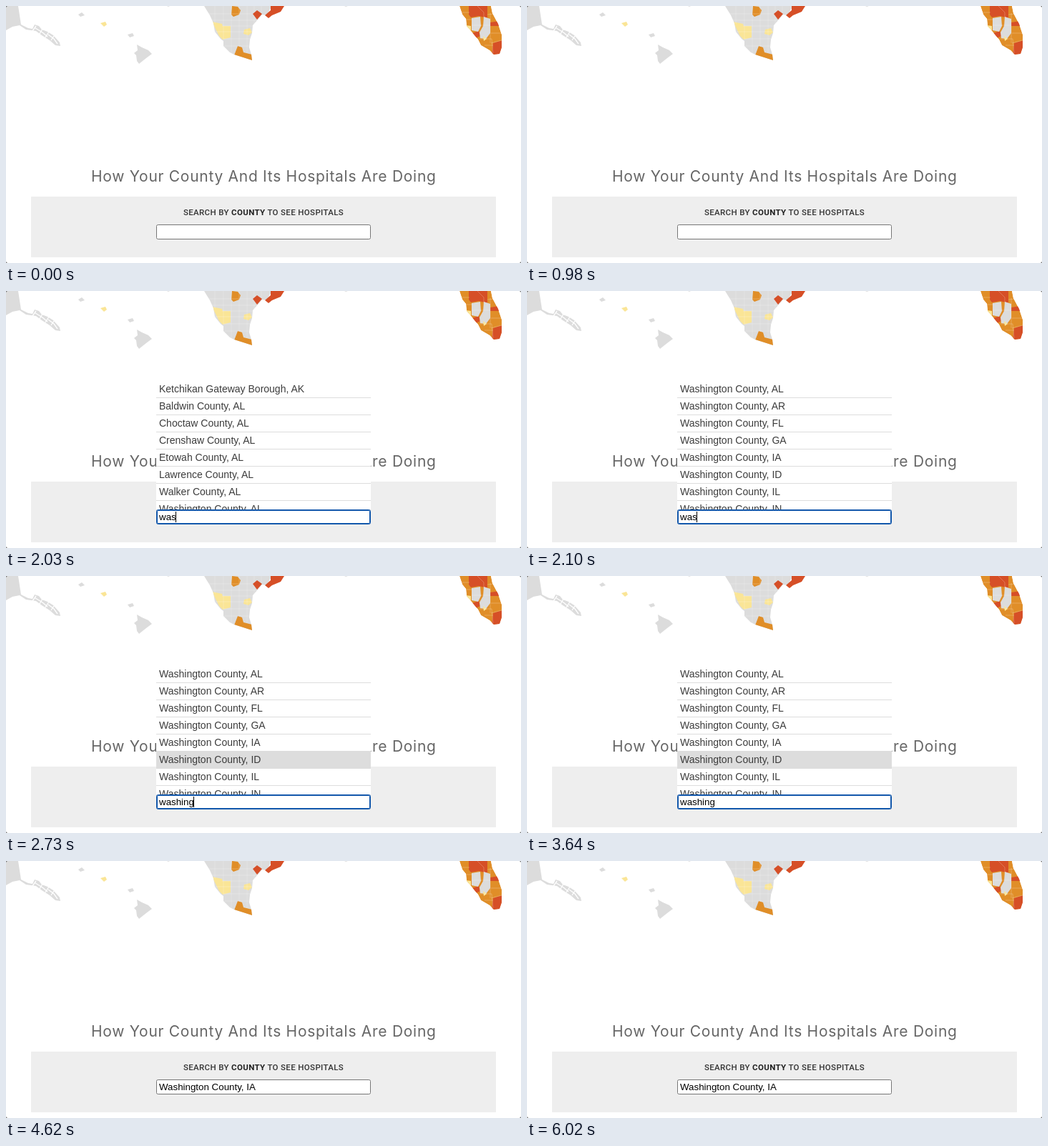
An HTML page for the animation above (6.51 s loop, 720 by 360 pixels).

```html
<!DOCTYPE html>
<html lang="en">
<head>
<meta charset="utf-8">
<title>County search</title>
<style>
  html, body { margin: 0; width: 100%; height: 100%; overflow: hidden; background: #fff; }
  #stage { position: relative; width: 720px; height: 360px; overflow: hidden; }
  svg { position: absolute; left: 0; top: 0; }
  .none { fill: #dcdcdc; }
  .low { fill: #fae596; }
  .mid { fill: #e08e28; }
  .high { fill: #d64f27; }
  .lines { fill: none; stroke: #fff; stroke-width: .5; stroke-opacity: .45; }
  .channels { fill: none; stroke: #fff; stroke-width: 1.3; }
  .heading { font: 400 21px Inter, sans-serif; font-optical-sizing: none; letter-spacing: .72px; fill: #666; }
  .label { font: 500 11.5px Roboto, sans-serif; letter-spacing: .35px; fill: #333; }
  .label tspan { font-weight: 700; fill: #222; }
  #list { position: absolute; left: 210px; top: 126px; width: 300px; height: 180px;
          overflow: hidden; background: #fff; }
  .row { box-sizing: border-box; height: 24px; padding-left: 4px; border-bottom: 1px solid #ddd;
         font: 14px/23px "Liberation Sans", Arial, sans-serif; color: #3c3c3c; white-space: pre; }
  .row.hover { background: #ddd; }
  #field { position: absolute; left: 210px; top: 306px; width: 300px; height: 21px; box-sizing: border-box;
           border: 1px solid #767676; border-radius: 2.5px; padding-left: 3px; background: #fff; color: #000;
           font: 13.333px/19px "Liberation Sans", Arial, sans-serif; white-space: pre; }
  #field.focus { border-color: #1257ab; box-shadow: inset 0 0 0 1px #1257ab; }
  #caret { position: absolute; top: 2px; width: 1px; height: 15px; margin-left: -.6px; background: #000; }
</style>
</head>
<body>
<div id="stage">
  <svg width="720" height="360" viewBox="0 0 720 360">
    <defs>
      <clipPath id="texasClip"><path id="texas" d="M277 0L285 13 290 24 292 36 300 46 304 49 304 56 313 65 319 68 344 76 343 68 340 58 341 47 344 38 345 27 352 19 358 12 364 13 372 0Z"/></clipPath>
      <clipPath id="floridaClip"><path id="florida" d="M634 0L638 12 643 18 644 28 650 35 660 47 664 55 676 62 682 68 690 67 693 58 693 40 688 25 680 10 678 0Z"/></clipPath>
    </defs>

    <g class="none">
      <path d="M0 0H17L21 26 31 31 37 32 40 26 46 28 50 33 58 36 66 41 75 51 76 56 69 55 61 48 50 41 42 35 28 33 19 27 9 29 0 34Z"/>
      <path d="M101 12L106 9 110 13 104 15Z"/>
      <path d="M170 40L177 38 179 42 173 44Z"/>
      <path d="M183 54L190 58 199 62 204 67 196 73 186 81 183 77 182 69 179 66 184 62Z"/>
      <path d="M225 0H229L227 1Z"/>
      <path d="M473 0H478L475 1Z"/>
      <use href="#texas"/>
    </g>
    <path class="channels" d="M37 35L42 28 M41 31L51 37 58 43 M47 39L51 32 M55 44L60 36 M59 40L67 46 72 53 M63 48L67 42"/>
    <path class="low" d="M132 24L139 22 141 26 137 29Z"/>

    <g clip-path="url(#texasClip)">
      <path class="low" d="M288 22L302 25 303 28 314 28 314 44 303 47 298 42Z M333 33L341 31 344 37 339 41 332 39Z"/>
      <path class="mid" d="M316 0L324 1 328 6 326 12 318 15 315 12Z M324 56L330 58 332 65 344 68 345 77 319 69Z"/>
      <path class="lines" d="M280 11H345 M286 20H354 M302 28H352 M292 36H350 M304 46H344 M305 56H342 M292 0V25 M304 0V47 M315 0V68 M326 0V57 M337 0V66 M347 0V40 M357 0V14"/>
    </g>
    <path class="high" d="M345 11L351 6 358 11 351 19Z M370 0H389L384 8 372 13 367 17 362 13 370 6Z"/>

    <g clip-path="url(#floridaClip)">
      <use href="#florida" class="mid"/>
      <path class="high" d="M647 0H673V17L661 14 650 16 647 12Z M677 23L690 21 691 28H677Z M652 38L661 35 663 42 655 46Z M681 52L694 48V69H679Z"/>
      <path class="none" d="M651 17L663 15 664 28 660 36 651 34Z M668 15L677 18V38L671 46 663 45 662 37 667 28Z"/>
      <path class="low" d="M643 27L650 28V35H644Z M667 42L672 46 668 49Z"/>
      <path class="lines" d="M636 9H648 M643 19H652 M659 0L668 9V17 M651 27H677 M677 10V52 M678 38H693 M662 46H679L681 66 M669 55H681 M678 52L693 48 M673 12L682 11"/>
    </g>

    <text class="heading" x="360.3" y="246" text-anchor="middle">How Your County And Its Hospitals Are Doing</text>
    <path fill="#eee" d="M35 267H685V352H35Z"/>
    <text class="label" x="360" y="293.3" text-anchor="middle">SEARCH BY <tspan>COUNTY</tspan> TO SEE HOSPITALS</text>
    <path fill="#777" d="M0 0H2L0 2Z M720 0H718L720 2Z M0 360H2L0 358Z M720 360H718L720 358Z"/>
  </svg>
  <div id="list"></div>
  <div id="field"><span id="typed"></span><span id="caret"></span></div>
</div>
<script>
const LOOP = 6510;
const LISTS = {
  any: ["Ketchikan Gateway Borough, AK",
        ...["Baldwin", "Choctaw", "Crenshaw", "Etowah", "Lawrence", "Walker", "Washington"]
          .map(name => `${name} County, AL`)],
  washington: ["AL", "AR", "FL", "GA", "IA", "ID", "IL", "IN"].map(state => `Washington County, ${state}`)
};

// Each step changes only the listed parts of the state.
const STEPS = [
  [0, { text: "", focus: false, caret: false, list: null, hover: -1 }],
  [1120, { focus: true, caret: true }],
  [1610, { caret: false }],
  [1680, { text: "w", caret: true }],
  [1750, { list: "any" }],
  [1890, { text: "wa" }],
  [2030, { text: "was" }],
  [2100, { list: "washington" }],
  [2170, { text: "wash", hover: 5 }],
  [2310, { text: "washi" }],
  [2520, { text: "washin" }],
  [2730, { text: "washing" }],
  [3290, { caret: false }],
  [3780, { caret: true }],
  [4340, { caret: false }],
  [4550, { hover: 4 }],
  [4620, { text: "Washington County, IA", focus: false, list: null, hover: -1 }]
];

const [list, field, typed, caret] =
  ["list", "field", "typed", "caret"].map(id => document.getElementById(id));
let shown = -1;

function show(index) {
  const state = Object.assign({}, ...STEPS.slice(0, index + 1).map(step => step[1]));
  typed.textContent = state.text;
  field.classList.toggle("focus", state.focus);
  caret.style.visibility = state.caret ? "visible" : "hidden";
  list.style.display = state.list ? "block" : "none";
  list.replaceChildren(...(LISTS[state.list] || []).map((name, i) => {
    const row = document.createElement("div");
    row.className = i === state.hover ? "row hover" : "row";
    row.textContent = name;
    return row;
  }));
}

function tick() {
  const time = performance.now() % LOOP;
  const index = STEPS.filter(([start]) => start <= time).length - 1;
  if (index !== shown) show(shown = index);
  requestAnimationFrame(tick);
}
tick();
</script>
</body>
</html>
```
